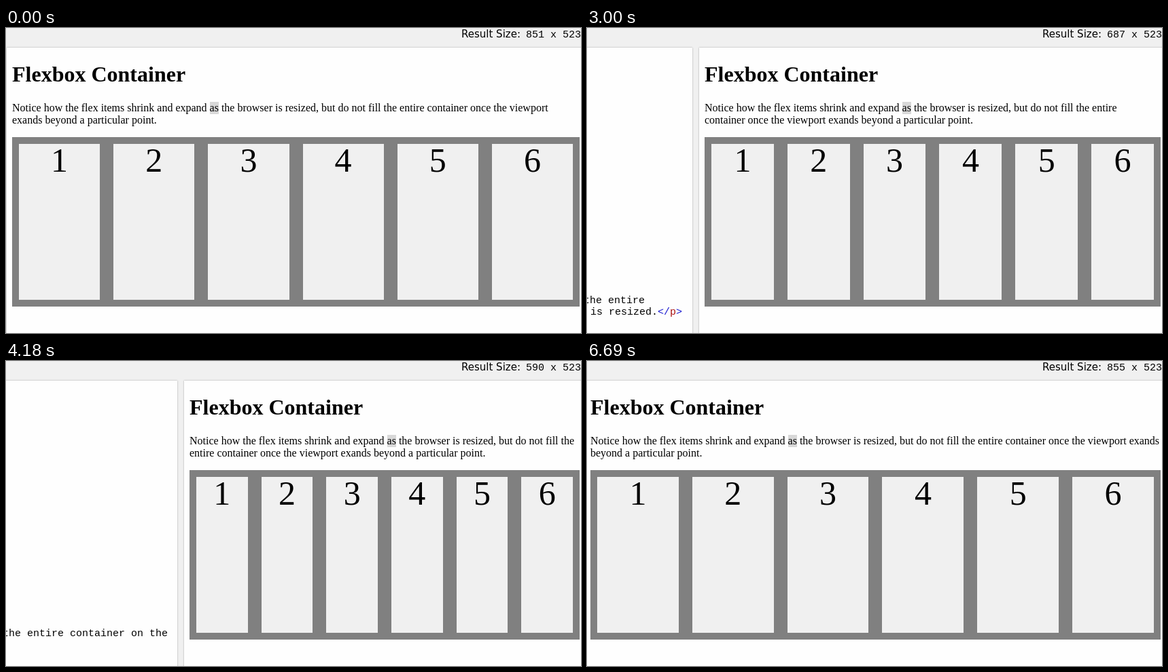
Animation of 846 by 450 pixels, one loop 6790 ms. Source, as an HTML page:

```html
<!DOCTYPE html>
<html lang="en">
<head>
<meta charset="utf-8">
<title>Flexbox Container</title>
<style>
html, body { margin: 0; width: 100%; height: 100%; overflow: hidden; background: #f0f0f0; }
#stage { position: relative; width: 846px; height: 450px; overflow: hidden; color: #000; }
#label, #size, .pane, .line { position: absolute; white-space: pre; }
#label { left: 670px; top: 0; font: 15px/18px "DejaVu Sans", sans-serif; }
#size, .line { font: 15px/17px "Liberation Mono", monospace; }
#size { left: 765px; top: 2px; }
.pane { top: 29px; height: 460px; background: #fefefe; box-shadow: 0 0 2px rgba(0, 0, 0, .35); }
#code { left: -20px; overflow: hidden; }
.line i { font-style: normal; color: #1a1ad0; }
.line b { font-weight: normal; color: #a11; }
#result { box-sizing: border-box; padding: 0 8px; white-space: normal; font: 16px/18px "Liberation Serif", serif; }
h1 { margin: 21px 0 23px; font-size: 32px; line-height: 36px; white-space: nowrap; }
p { margin: 0 0 16px; padding-right: 1px; }
mark { display: inline-block; height: 18px; color: inherit; background: #d8d8d8; }
#flex { display: flex; height: 250px; background: #808080; }
#flex div { flex: 1; margin: 10px; background: #f0f0f0; font-size: 50px; line-height: 48px; text-align: center; }
</style>
</head>
<body>
<div id="stage">
  <div class="pane" id="code">
    <div class="line" id="line1" style="top:365px"></div>
    <div class="line" id="line2" style="top:382px"></div>
  </div>
  <div class="pane" id="result">
    <h1>Flexbox Container</h1>
    <p>Notice how the flex items shrink and expand <mark>as</mark> the browser is resized, but do not fill the entire container once the viewport exands beyond a particular point.</p>
    <div id="flex"><div>1</div><div>2</div><div>3</div><div>4</div><div>5</div><div>6</div></div>
  </div>
  <span id="label">Result Size:</span><span id="size"></span>
</div>
<script>
const $ = id => document.getElementById(id);
const LOOP = 6790, CHAR = 9, GUTTER = 10, CODE_LEFT = -20, PAD = 13;

// Viewport widths while the divider is dragged
const widths = [851, 846, 817, 777, 733, 687, 640, 592, 546, 532, 528, 538, 560, 590,
  635, 682, 728, 770, 807, 834, 849, 853, 855];
const shortHolds = [8, 11, 13, 18];
const holdOf = i => i === 0 ? 2400 : shortHolds.includes(i) ? 140 : 150;

function widthAt(t) {
  let i = 0;
  while (i < widths.length - 1 && t >= holdOf(i)) t -= holdOf(i++);
  return widths[i];
}

// Returns the words that fit between x and limit
function fit(words, x, limit) {
  const out = [];
  for (const word of words) {
    const end = x + CHAR * word.length;
    if (end > limit) break;
    out.push(word);
    x = end + CHAR;
  }
  return out.join(" ");
}

function drawCode(edge) {
  const limit = edge - PAD;
  const first = fit(["the", "entire", "container", "on", "the"], -5, limit);
  const x = 5 + CHAR * ("the entire".length - first.length);
  const second = fit(["is", "resized.</p>"], x, limit);
  $("line1").textContent = first;
  $("line1").style.left = -5 - CODE_LEFT + "px";
  $("line2").innerHTML = second.replace("</p>", "<i>&lt;/</i><b>p</b><i>&gt;</i>");
  $("line2").style.left = x - CODE_LEFT + "px";
}

let shown;
function frame(now) {
  const width = widthAt(now % LOOP);
  if (width !== shown) {
    shown = width;
    const left = 852 - width, edge = left - GUTTER;
    $("result").style.left = left + "px";
    $("result").style.width = width + "px";
    $("code").style.width = Math.max(0, edge - CODE_LEFT) + "px";
    $("code").style.visibility = edge > 0 ? "visible" : "hidden";
    $("size").textContent = width + " x 523";
    drawCode(edge);
  }
  requestAnimationFrame(frame);
}
frame(0);
</script>
</body>
</html>
```
